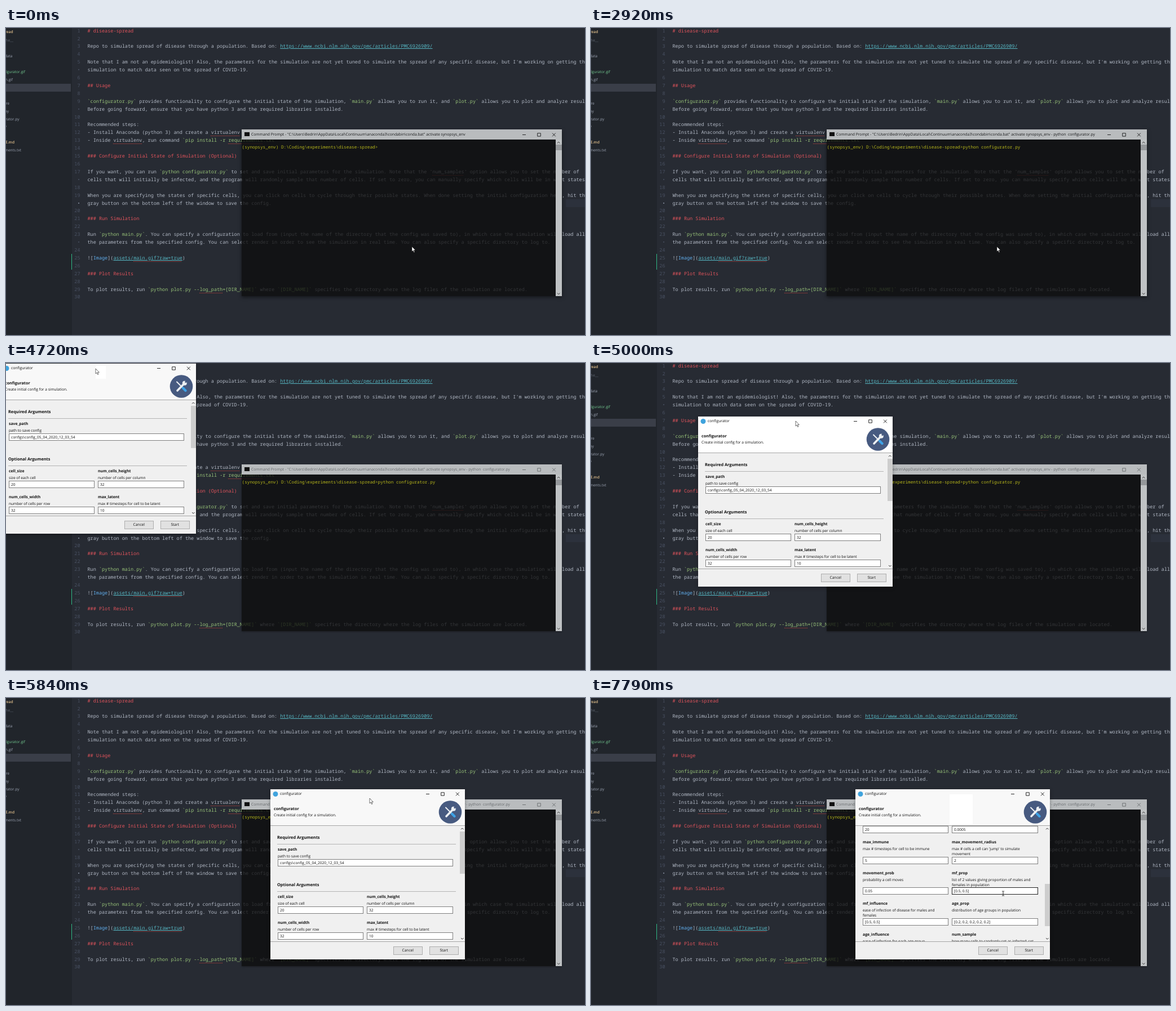
Animation of 1027 by 545 pixels, one loop 8 s. Source, as an HTML page:

```html
<!DOCTYPE html>
<html lang="en">
<head>
<meta charset="utf-8">
<title>Configurator demo</title>
<style>
html, body { margin: 0; width: 100%; height: 100%; overflow: hidden; background: #272b33; }
#stage {
  position: absolute; left: 0; top: 0; width: 1027px; height: 545px; overflow: hidden;
  background: #272b33; font: 6.6px "Open Sans", sans-serif; text-rendering: geometricPrecision;
}
#stage div, #stage pre, #stage svg { position: absolute; box-sizing: border-box; margin: 0; }
#stage * { animation-duration: 8s; animation-timing-function: step-end; animation-iteration-count: infinite; }
svg { overflow: visible; }

/* editor */
#side { width: 117px; height: 545px; background: #21252b; overflow: hidden; }
#side div { white-space: pre; line-height: 12px; margin-top: -5.6px; color: #9da5b4; }
#side .picked { left: 0; top: 99px; width: 115px; height: 14px; margin: 0; background: #3a3e48; }
#side .mod { color: #e2c08d; font-weight: 600; }
#side .new { color: #73c990; }
#side .dim { color: #5f6672; }
#row { left: 993px; top: 304px; width: 34px; height: 14px; background: #2c313c; }
#git { left: 116px; top: 401px; width: 1px; height: 28px; background: #2fb886; }
pre { font: 8.507px/13.91px "Noto Sans Mono", "DejaVu Sans Mono", monospace; top: -1.4px; }
#nums { left: 117px; width: 14.5px; text-align: right; color: #495162; }
#nums b { font-weight: 400; color: #8a93a3; }
#doc { left: 144.5px; color: #b2b9c5; }
#doc b { font-weight: 400; color: #e2545c; }
#doc code { font: inherit; color: #98c379; }
#doc a { color: #56b6c2; text-decoration: underline; }
#doc i { font-style: normal; color: #61afef; }
#doc u { text-decoration: underline dotted #c8453f 1px; text-underline-offset: 2.5px; }

/* console */
#cmd {
  left: 418px; top: 180px; width: 567.5px; height: 296px; background: rgba(12,12,12,.77);
  box-shadow: 0 2px 6px rgba(0,0,0,.5); animation-name: settle;
}
#cmd .bar { width: 567.5px; height: 17.5px; background: #b9bcbe; color: #161718; animation-name: idle; }
#cmd .icon { left: 5px; top: 5px; width: 9px; height: 7px; background: #111; }
.cap { white-space: pre; font-size: 6.75px; line-height: 12px; }
.cap span { animation-name: running; }
.btns { width: 60px; height: 7px; fill: none; stroke: currentColor; stroke-width: .9; }
.cli {
  top: 26px; font: 7.725px/12px "Noto Sans Mono", "DejaVu Sans Mono", monospace;
  white-space: pre; color: #b8b81c; overflow: hidden;
}
#typed { left: 241.5px; animation-name: type; }
#caret { left: 241.5px; width: 1ch; height: 12px; animation-name: caret; }
#caret::after { content: ""; position: absolute; left: 0; bottom: 1px; width: 100%; height: 1px; background: #c8c8c8; }
#cmd .rail { left: 557px; top: 17.5px; width: 10.5px; height: 278.5px; background: #bfc2c4; }
#cmd .grip { left: 0; top: 9.5px; width: 10.5px; height: 10px; background: #94979a; }
.tick { fill: none; stroke: #333; stroke-width: 1; }

@keyframes settle { 38.375% { box-shadow: 0 1px 3px rgba(0,0,0,.35); } }
@keyframes idle { 38.375% { color: #686b6e; } }
@keyframes running { 0% { opacity: 0; } 34.625% { opacity: 1; } }
@keyframes type {
  0% { width: 0; } 3.5% { width: 1ch; } 5.25% { width: 2ch; } 7% { width: 3ch; }
  8.75% { width: 4ch; } 10.5% { width: 6ch; } 12.25% { width: 8ch; } 14.125% { width: 9ch; }
  17.25% { width: 10ch; } 20.75% { width: 12ch; } 22.5% { width: 15ch; } 24.125% { width: 17ch; }
  25.875% { width: 20ch; } 27.625% { width: 22ch; }
}
@keyframes caret {
  0% { opacity: 0; } 14.125% { opacity: 1; margin-left: 9ch; } 17.25% { opacity: 0; }
  27.625% { opacity: 1; margin-left: 22ch; } 34.625% { opacity: 0; }
}

/* dialog */
#dlg {
  width: 345px; height: 302px; background: #f0f0f0; color: #111;
  box-shadow: 0 2px 6px rgba(0,0,0,.35); animation-name: drag;
}
#head { width: 100%; height: 65px; background: #f8f8f8; border-bottom: 1px solid #a5a5a5; animation-name: head; }
#patch { background: #fff; animation-name: patch; }
#pane { left: 0; top: 65px; width: 345px; height: 205px; overflow: hidden; animation-name: scroll; --n: 0; }
#form { left: 0; top: calc(-65px - var(--n) * 34.7px); width: 335px; height: 560px; }
#track { left: 336px; top: 0; width: 9px; height: 205px; background: #f0f0f0; }
#thumb { left: 0; top: calc(10px + var(--n) * 13.3px); width: 9px; height: 75px; background: #cdcdcd; }
#foot { top: 270px; width: 100%; height: 32px; border-top: 1px solid #a5a5a5; }
#foot div { top: 8px; width: 51.5px; height: 15px; border: 1px solid #adadad; background: #e1e1e1; text-align: center; line-height: 12.6px; }
.t { white-space: pre; line-height: 9px; margin-top: -4.3px !important; }
.b { font-weight: 700; font-size: 6.85px; }
.h { font-weight: 700; font-size: 7.35px; }
.rule { height: 1px; background: #b4b4b4; }
.box {
  height: 13px; margin-top: -6.5px !important; padding-left: 3px; white-space: pre;
  border: 1px solid #7f7f7f; background: #fff; line-height: 11.2px;
}
.save_path { animation-name: hover1; }
.num_cells_height { animation-name: hover2; }
.mf_prop { animation-name: hover3; }

@keyframes drag {
  0% { opacity: 0; left: -8px; top: 1px; transform: scale(.98); }
  45.375% { opacity: .64; left: -8px; top: 1px; transform: scale(.98); }
  47% { opacity: 1; left: -8px; top: 1px; transform: none; }
  60.875% { left: 60px; top: 35px; }
  62.5% { left: 190px; top: 95px; }
  64.25% { left: 300px; top: 138px; }
  66% { left: 385px; top: 160px; }
  67.625% { left: 427px; top: 167px; }
  69.5% { left: 460px; top: 165px; }
  71.125% { left: 469px; top: 162px; }
  100% { opacity: 1; left: 469px; top: 162px; transform: none; }
}
@keyframes head { 60.875% { background: #fff; } 73% { background: #f8f8f8; } }
@keyframes patch {
  0% { opacity: 0; }
  59% { opacity: 1; left: 167px; top: 4px; width: 18px; height: 23px; }
  60.875% { opacity: 0; left: 167px; top: 9px; width: 41px; height: 54px; }
  74.75% { opacity: 1; left: 167px; top: 9px; width: 41px; height: 54px; }
  100% { opacity: 1; left: 167px; top: 9px; width: 41px; height: 54px; }
}
@keyframes scroll {
  0% { --n: 0; } 85.125% { --n: 1; } 86.875% { --n: 2; } 88.625% { --n: 3; } 90.375% { --n: 4; }
  93.875% { --n: 5; } 95.625% { --n: 6; } 97.375% { --n: 7; } 100% { --n: 7; }
}
@keyframes hover1 { 76.5% { border-color: #222; } 81.75% { border-color: #7f7f7f; } }
@keyframes hover2 { 85.125% { border-color: #444; } 86.875% { border-color: #7f7f7f; } }
@keyframes hover3 { 97.375% { border-color: #222; } }

/* pointer */
#arrow { animation-name: point; }
#beam { left: 730.5px; top: 347px; animation-name: beam; }
@keyframes point {
  0% { left: 719.5px; top: 388px; }
  48.875% { left: 690px; top: 365px; }
  50.625% { left: 590px; top: 290px; }
  52.375% { left: 440px; top: 190px; }
  54.125% { left: 300px; top: 95px; }
  55.75% { left: 205px; top: 38px; }
  57.5% { left: 165px; top: 14px; }
  59% { left: 159px; top: 10px; }
  60.875% { left: 233px; top: 43px; }
  62.5% { left: 363px; top: 103px; }
  64.25% { left: 473px; top: 146px; }
  66% { left: 558px; top: 168px; }
  67.625% { left: 600.5px; top: 175px; }
  69.5% { left: 633px; top: 173px; }
  71.125% { left: 643px; top: 170px; }
  73% { left: 645px; top: 178px; }
  74.75% { left: 665px; top: 215px; }
  76.5% { left: 705px; top: 300px; opacity: 1; }
  78.25% { opacity: 0; }
  100% { left: 730px; top: 347px; opacity: 0; }
}
@keyframes beam { 0% { opacity: 0; } 78.25% { opacity: 1; } }
</style>
</head>
<body>
<div id="stage">
  <div id="side"><div class="picked"></div></div>
  <div id="row"></div>
  <div id="git"></div>
  <pre id="nums"></pre>
  <pre id="doc"><b># disease-spread</b>

Repo to simulate spread of disease through a population. Based on: <a>https://www.ncbi.nlm.nih.gov/pmc/articles/PMC6926909/</a>

Note that I am not an epidemiologist! Also, the parameters for the simulation are not yet tuned to simulate the spread of any specific disease, but I'm working on getting the
simulation to match data seen on the spread of COVID-19.

<b>## Usage</b>

<code>`configurator.py`</code> provides functionality to configure the initial state of the simulation, <code>`main.py`</code> allows you to run it, and <code>`plot.py`</code> allows you to plot and analyze results.
Before going forward, ensure that you have python 3 and the required libraries installed.

Recommended steps:
- Install Anaconda (python 3) and create a <u>virtualenv</u>
- Inside <u>virtualenv</u>, run command <code>`pip install -r <u>requirements</u>.txt`</code>

<b>### Configure Initial State of Simulation (Optional)</b>

If you want, you can run <code>`python configurator.py`</code> to set and save initial parameters for the simulation. Note that the '<u>num_samples</u>' option allows you to set the number of
cells that will initially be infected, and the program will randomly sample that number of cells. If set to zero, you can manually specify which cells will be in what states.

When you are specifying the states of specific cells, you can click on cells to cycle through their possible states. When done setting the initial configuration here, hit the
gray button on the bottom left of the window to save the config.

<b>### Run Simulation</b>

Run <code>`python main.py`</code>. You can specify a configuration to load from (input the name of the directory that the config was saved to), in which case the simulation will load all
the parameters from the specified config. You can select render in order to see the simulation in real time. You can also specify a specific directory to log to.

![<i>Image</i>](<a>assets/<u>main.gif?raw=true</u></a>)

<b>### Plot Results</b>

To plot results, run <code>`python plot.py --<u>log_path</u>=[DIR_NAME]`</code> where <code>`[DIR_NAME]`</code> specifies the directory where the log files of the simulation are located.
</pre>

  <div id="cmd">
    <div class="bar">
      <div class="icon"></div>
      <div class="cap" style="left:17px;top:2.7px">Command Prompt - "C:\Users\Bedrin\AppData\Local\Continuum\anaconda3\condabin\conda.bat" activate synopsys_env<span> - python  configurator.py</span></div>
      <svg class="btns" style="left:498px;top:5.5px"><use href="#ctl"/></svg>
    </div>
    <div class="cli" style="left:.5px">(synopsys_env) D:\Coding\experiments\disease-spread&gt;</div>
    <div class="cli" id="typed">python configurator.py</div>
    <div class="cli" id="caret"></div>
    <div class="rail">
      <div class="grip"></div>
      <svg class="tick" width="10" height="279"><path d="M2.9 6.5 5.2 4.2 7.5 6.5M2.9 272.5 5.2 274.8 7.5 272.5"/></svg>
    </div>
  </div>

  <div id="dlg">
    <div id="head">
      <div id="patch"></div>
      <svg width="345" height="64">
        <circle cx="9" cy="8.5" r="4.5" fill="#3fa3dd"/>
        <g transform="translate(319 40.5)" fill="none" stroke-linecap="round">
          <circle r="20.3" fill="#475a80"/>
          <path d="M-7 7.5 5 -5" stroke="#eceff2" stroke-width="3.6"/>
          <circle cx="5.8" cy="-5.8" r="4" fill="#eceff2"/>
          <path d="M7 -7 10.5 -10.5" stroke="#475a80" stroke-width="3" stroke-linecap="butt"/>
          <path d="M-8 -8 2 2" stroke="#eceff2" stroke-width="2"/>
          <path d="M3 3 7.5 7.5" stroke="#3ea2e6" stroke-width="4.4"/>
        </g>
      </svg>
      <div class="cap" style="left:17px;top:2.4px">configurator</div>
      <svg class="btns" style="left:276px;top:5px"><use href="#ctl"/></svg>
      <div class="t b" style="left:6px;top:35.5px;font-size:7.15px">configurator</div>
      <div class="t" style="left:6px;top:45.5px">Create initial config for a simulation.</div>
    </div>
    <div id="pane">
      <div id="form"></div>
      <div id="track">
        <div id="thumb"></div>
        <svg class="tick" width="10" height="205"><path d="M2 6.3 4.3 4 6.6 6.3M2 199 4.3 201.3 6.6 199"/></svg>
      </div>
    </div>
    <div id="foot">
      <div style="left:218px">Cancel</div>
      <div style="left:282px">Start</div>
    </div>
  </div>

  <svg id="arrow" width="8" height="12"><path d="M0 0V9L2.1 7.1 3.6 10.5 5 9.9 3.5 6.6H6.3Z" fill="#fff" stroke="#111" stroke-width=".6"/></svg>
  <svg id="beam" width="4" height="9"><path d="M-2 -4H-.4M.4 -4H2M0 -3.8V3.8M-2 4H-.4M.4 4H2" stroke="#111" stroke-width=".9"/></svg>
  <svg width="0" height="0"><symbol id="ctl" overflow="visible"><path d="M0 3.5H6M26.7 .8H32.3V6.2H26.7ZM53 .6 58.8 6.4M58.8 .6 53 6.4"/></symbol></svg>
</div>
<script>
const $ = id => document.getElementById(id);

function put(parent, cls, style, text = '') {
  const el = document.createElement('div');
  el.className = cls;
  for (const key in style) el.style[key] = style[key] + 'px';
  el.textContent = text;
  parent.append(el);
}

// Tree names run off the left edge: y, right end, name, state
[
  [7, 12.5, 'disease-spread', 'mod'], [22, 13, '__pycache__', 'dim'], [50, 11.5, 'data', ''],
  [78, 34, 'configurator.gif', 'new'], [92, 12, 'main.gif', ''], [134, 6, '.gitignore', ''],
  [148, 5, 'cell.py', ''], [162, 23.5, 'configurator.py', ''], [175, 1, 'main.py', ''],
  [203, 15, 'README.md', 'mod'], [217, 27, 'requirements.txt', '']
].forEach(([y, end, name, state]) => put($('side'), state, { top: y, right: 117 - end }, name));

// Wrapped lines get a bullet under their number
const wrapped = [5, 9, 17, 19, 23];
let nums = '';
for (let i = 1; i <= 30; i++) {
  nums += i + '\n';
  if (wrapped.includes(i)) nums += i === 19 ? '<b>•</b>\n' : '•\n';
}
$('nums').innerHTML = nums;

const form = $('form');
function section(y, title) {
  put(form, 't h', { left: 12, top: y }, title);
  put(form, 'rule', { left: 12, top: y + 10, width: 317 });
}
function entry(left, y, width, drop, [name, note, value]) {
  put(form, 't b', { left, top: y }, name);
  put(form, 't', { left, top: y + 11 }, note);
  put(form, 'box ' + name, { left, top: y + drop, width }, value);
}

section(86.5, 'Required Arguments');
entry(13, 107.5, 311, 23, ['save_path', 'path to save config', 'configs\\config_05_04_2020_12_03_54']);
section(170.5, 'Optional Arguments');

const fields = [
  ['cell_size', 'size of each cell', '20'],
  ['num_cells_height', 'number of cells per column', '32'],
  ['num_cells_width', 'number of cells per row', '32'],
  ['max_latent', 'max # timesteps for cell to be latent', '10'],
  ['max_infected', 'max # timesteps for cell to be infected', '20'],
  ['prob_death', 'probability of dying at current timestep if\ninfected', '0.0005'],
  ['max_immune', 'max # timesteps for cell to be immune', '5'],
  ['max_movement_radius', "max # cells a cell can 'jump' to simulate\nmovement", '2'],
  ['movement_prob', 'probability a cell moves', '0.05'],
  ['mf_prop', 'list of 2 values giving proportion of males and\nfemales in population', '[0.5, 0.5]'],
  ['mf_influence', 'ease of infection of disease for males and\nfemales', '[0.5, 0.5]'],
  ['age_prop', 'distribution of age groups in population', '[0.2, 0.2, 0.2, 0.2, 0.2]'],
  ['age_influence', 'ease of infection for each age group', ''],
  ['num_sample', 'how many cells to randomly set as infected; set', '']
];
let y = 191.5;
for (let i = 0; i < fields.length; i += 2) {
  const tall = i >= 4;
  const drop = tall ? 31.5 : 23;
  entry(13, y, 152, drop, fields[i]);
  entry(171, y, 153, drop, fields[i + 1]);
  y += tall ? 54.5 : 45.8;
}
</script>
</body>
</html>
```
